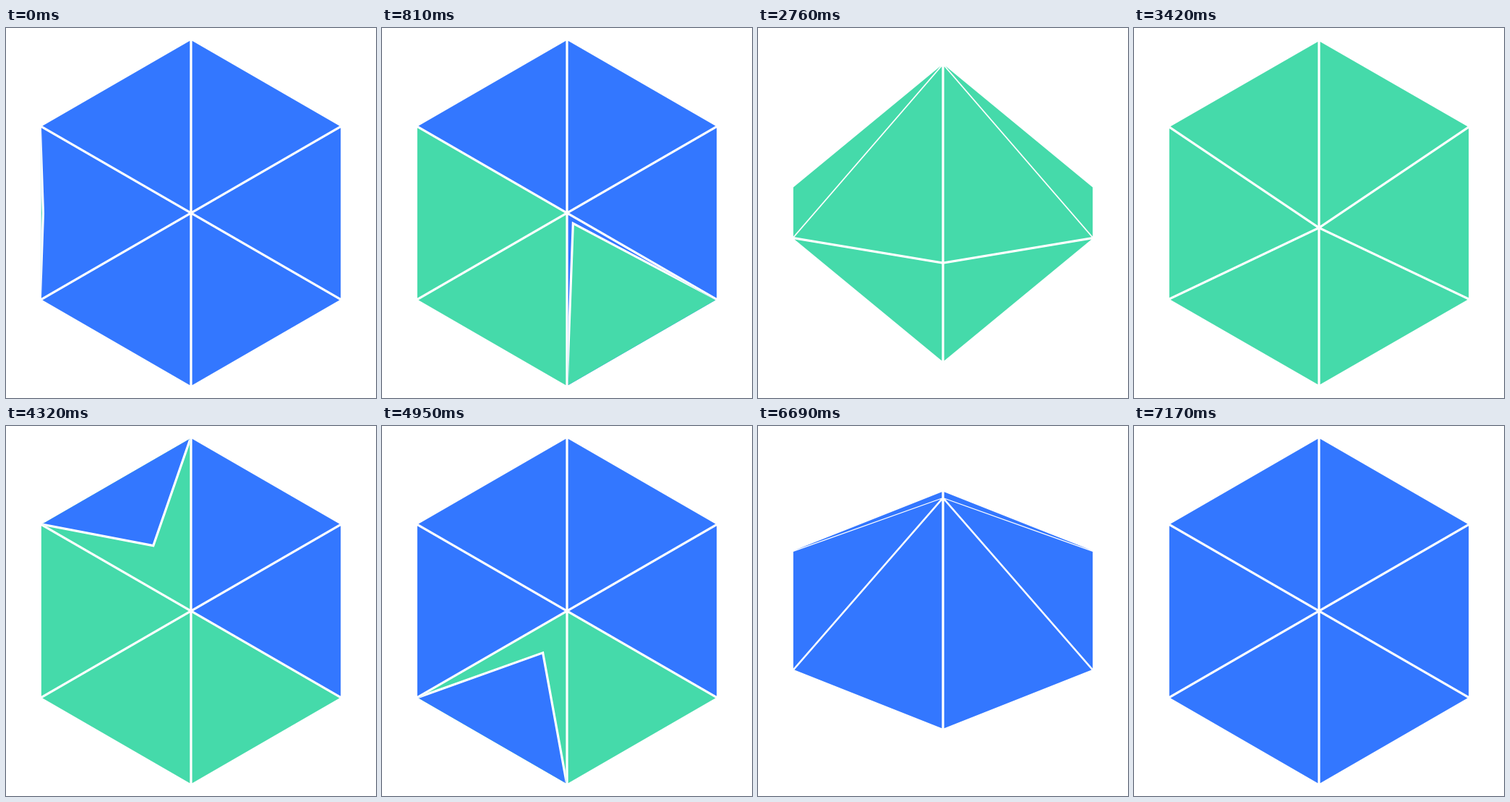
Write an HTML page with a canvas that moves like this. It is 512x512 px and loops after 7.2 s.

```html
<!DOCTYPE html>
<html lang="en">
<head>
<meta charset="utf-8">
<title>Turning hexagonal bipyramid</title>
<style>
  html, body { margin: 0; width: 100%; height: 100%; overflow: hidden; background: #fff; }
  canvas { display: block; width: 512px; height: 512px; }
</style>
</head>
<body>
<canvas id="stage" width="512" height="512"></canvas>
<script>
const ctx = document.getElementById('stage').getContext('2d');
const BLUE = '#3377ff', GREEN = '#45daaa';
const LOOP = 7200, HALF = 3600, STEP = 30;
const TILE = 300, FLIP_START = 2160, FLIP_TIME = 1440;
const MID = 256, RADIUS = 241, HEIGHT = 216;
const SHRINK = 0.977, GAP = 3.2;

const quad = p => p < 0.5 ? 2 * p * p : 1 - 2 * (1 - p) * (1 - p);
const smooth = p => p * p * (3 - 2 * p);
const mix = (a, b, p) => a.map((v, i) => v + (b[i] - v) * p);
const clamp = p => Math.max(0, Math.min(1, p));

// Rim corners, counter-clockwise from the top
const rim = Array.from({ length: 6 }, (_, i) => {
  const a = Math.PI / 2 + i * Math.PI / 3;
  return [RADIUS * Math.cos(a), RADIUS * Math.sin(a), 0];
});

const faces = [];
for (let i = 0; i < 6; i++) {
  const a = rim[i], b = rim[(i + 1) % 6];
  faces.push({ tile: i, corners: [[0, 0, HEIGHT], a, b] });
  faces.push({ tile: i, corners: [[0, 0, -HEIGHT], b, a] });
}

function project([x, y, z], angle) {
  return [MID + x, MID - y * Math.cos(angle) - z * Math.sin(angle)];
}

function trace(points) {
  ctx.beginPath();
  points.forEach(p => ctx.lineTo(p[0], p[1]));
}

function fill(points, color) {
  trace(points);
  ctx.closePath();
  ctx.fillStyle = color;
  ctx.fill();
}

function inset(points) {
  const center = [0, 1].map(k => (points[0][k] + points[1][k] + points[2][k]) / 3);
  return points.map(p => mix(center, p, SHRINK));
}

function facing([a, b, c]) {
  return (b[0] - a[0]) * (c[1] - a[1]) - (b[1] - a[1]) * (c[0] - a[0]) < 0;
}

// The new colour grows from one edge towards the opposite corner
function drawWipe([apex, first, second], order, p, color) {
  const [a, b, goal] = order % 2 ? [apex, first, second] : [first, second, apex];
  const tip = mix(mix(a, b, 0.5), goal, quad(p));
  ctx.save();
  trace(inset([apex, first, second]));
  ctx.closePath();
  ctx.clip();
  fill([a, tip, b], color);
  trace([a, tip, b]);
  ctx.strokeStyle = '#fff';
  ctx.lineWidth = GAP;
  ctx.stroke();
  ctx.restore();
}

function draw(time) {
  const second = time >= HALF;
  const t = time % HALF;
  const [from, to] = second ? [GREEN, BLUE] : [BLUE, GREEN];
  const start = second ? 4 : 1;
  const turn = smooth(clamp((t - FLIP_START) / FLIP_TIME));
  const angle = Math.PI * turn * (second ? -1 : 1);

  ctx.fillStyle = '#fff';
  ctx.fillRect(0, 0, 512, 512);

  for (const { tile, corners } of faces) {
    const pts = corners.map(c => project(c, angle));
    if (!facing(pts)) continue;
    const order = (tile - start + 6) % 6;
    const p = clamp(t / TILE - order);
    fill(inset(pts), p < 1 ? from : to);
    if (p > 0 && p < 1) drawWipe(pts, order, p, to);
  }
}

const begin = performance.now();
function frame() {
  const t = performance.now() - begin;
  draw((Math.floor(t / STEP) + 1) * STEP % LOOP);
  requestAnimationFrame(frame);
}
frame();
</script>
</body>
</html>
```
